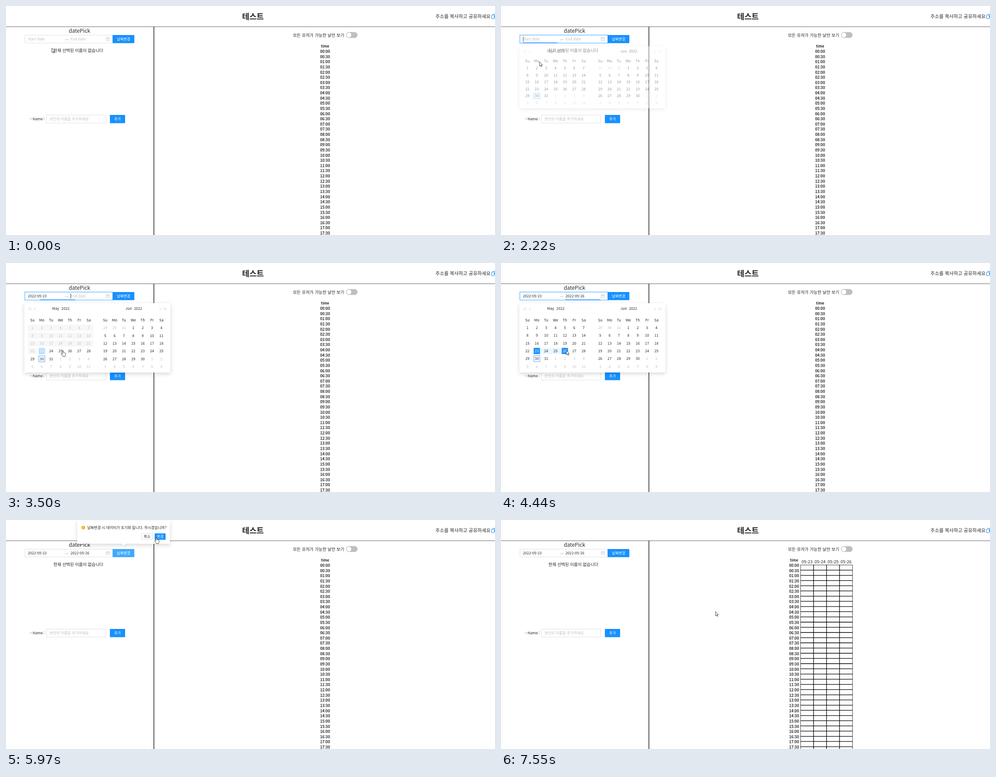
Animation, 1092 px wide and 513 px high, one loop 7750 ms. Source, as an HTML page:

```html
<!DOCTYPE html>
<html lang="ko">
<head>
<meta charset="utf-8">
<title>datePick</title>
<style>
  html, body { margin: 0; width: 100%; height: 100%; overflow: hidden; background: #fff; }
  svg { display: block; width: 100vw; height: 100vh; }
  text { font: 8.2px "Noto Sans CJK KR", "Noto Sans CJK", "Noto Sans", sans-serif; fill: #262626; white-space: pre; }
  .mid { text-anchor: middle; }
  .medium { font-weight: 500; }
  .bold { font-weight: 700; }
  .hint { fill: #bfbfbf; }
  .light { fill: #fff; font-weight: 500; }
  .line { fill: none; stroke: #bfbfbf; stroke-width: .8; }
  .field { fill: #fff; stroke: #d9d9d9; stroke-width: .8; }
  .blue { fill: #1890ff; }
  .float { fill: #fff; filter: drop-shadow(0 3px 5px rgba(0, 0, 0, .16)); }
  .cursor { fill: #fff; stroke: #111; stroke-width: .75; stroke-linejoin: round; }
</style>
</head>
<body>
<svg id="stage" viewBox="0 0 1092 513">
  <rect y="46" width="1092" height="1" fill="#666"/>
  <rect x="329.7" y="46.5" width="1.3" height="467" fill="#000"/>
  <text class="mid bold" x="551.5" y="30.3" style="font-size:17.6px">테스트</text>
  <text class="medium" x="959" y="27" style="font-size:10.6px">주소를 복사하고 공유하세요</text>
  <path d="M1086.5 18.5H1091.5V26M1084.5 20.5H1089L1090.3 22V28.3H1084.5Z" fill="none" stroke="#1890ff"/>

  <text class="mid" x="164.2" y="60.3" style="font-size:11.8px">datePick</text>
  <rect id="glow" x="41.4" y="64.4" width="197.4" height="19.2" fill="none" stroke="#1890ff" stroke-opacity=".22" stroke-width="1.4"/>
  <rect id="range" class="field" x="42.3" y="65.3" width="196" height="17.6"/>
  <text id="from" x="48.7" y="77.2"></text>
  <text id="to" x="144" y="77.2"></text>
  <path class="line" d="M131 75.6H139L136.6 73.4"/>
  <path class="line" d="M223.7 71.2H230.6V77.6H223.7ZM223.7 73.6H230.6M225.5 70V72M228.8 70V72"/>
  <rect id="bar" y="81.7" width="78" height="1.3" class="blue"/>
  <rect id="caret" y="68.5" width=".8" height="11.5" fill="#222"/>
  <rect id="change" x="238" y="65" width="48.6" height="18.3" rx=".8"/>
  <text class="mid light" x="262.5" y="77.2">날짜변경</text>
  <text class="mid medium" x="161.5" y="103.4" style="font-size:9.4px">현재 선택된 이름이 없습니다</text>

  <text x="53.8" y="257.6" style="fill:#ff4d4f">*</text>
  <text x="59.6" y="256.4">Name</text>
  <text x="84" y="256.4">:</text>
  <rect class="field" x="90.3" y="244.3" width="132.2" height="17.8"/>
  <text class="hint" x="97.3" y="256.4">본인의 이름을 추가하세요</text>
  <rect class="blue" x="232" y="244" width="34" height="18.4" rx=".8"/>
  <text class="mid light" x="249" y="256.4">추가</text>

  <text class="medium" x="640.7" y="68.6" style="font-size:9.45px">모든 유저가 가능한 날만 보기</text>
  <rect x="759.2" y="58.6" width="25.8" height="13" rx="6.5" fill="#bfbfbf"/>
  <circle cx="765.8" cy="65.1" r="5.3" fill="#fff"/>
  <g id="times"></g>
  <g id="table"></g>

  <g id="panel">
    <g class="float"><path id="notch" d="M-4.5 90.5L0 86.5L4.5 90.5Z"/><rect x="41" y="90" width="326" height="155.6" rx="1"/></g>
    <path class="line" d="M53 100.2L50.2 102.9L53 105.6M56.6 100.2L53.8 102.9L56.6 105.6M65.6 100.2L62.8 102.9L65.6 105.6M342.8 100.2L345.6 102.9L342.8 105.6M351.6 100.2L354.4 102.9L351.6 105.6M355.2 100.2L358 102.9L355.2 105.6"/>
    <text class="medium" x="103" y="105.3">May</text><text class="medium" x="123.6" y="105.3">2022</text>
    <text class="medium" x="266.8" y="105.3">Jun</text><text class="medium" x="285.7" y="105.3">2022</text>
    <rect id="strip" x="80" y="190.2" width="62.6" height="14" fill="#e6f7ff"/>
    <g id="days"></g>
    <path id="dash" fill="none" stroke="#7ec1ff" stroke-width=".7" stroke-dasharray="1.6 1.2"/>
    <rect x="73.2" y="208" width="13.6" height="13.4" fill="none" stroke="#1890ff" stroke-width=".8"/>
  </g>

  <g id="confirm">
    <g class="float"><path d="M257 52L262.4 57.6L268 52Z"/><rect x="159" y="1" width="207" height="52.2" rx="1"/></g>
    <circle cx="172.6" cy="17" r="4.1" fill="#faad14"/>
    <path d="M172.6 14.6V17.7M172.6 18.6V19.5" stroke="#fff" stroke-width=".9"/>
    <text x="181.2" y="20" style="font-size:8.25px">날짜변경 시 데이터가 초기화 됩니다. 하시겠습니까?</text>
    <rect class="field" x="303.3" y="30.4" width="23.8" height="13.6"/>
    <text class="mid" x="315.2" y="40.3">취소</text>
    <rect id="ok" x="332" y="30" width="24.4" height="14.3" rx=".8"/>
    <text class="mid light" x="344.2" y="40.3">변경</text>
  </g>

  <g id="pointer" class="cursor">
    <path id="arrow" d="M0 0V9.6L2.2 7.6L3.7 11L5.2 10.4L3.7 7.1H6.7Z"/>
    <path id="hand" d="M-1.1 .8Q-1.1 -.2 0 -.2Q1.1 -.2 1.1 .8V4.6Q2.1 4 2.8 5Q3.8 4.4 4.5 5.4Q6.1 5 6.1 6.8V9.5Q6.1 11 5.1 12V13.4H-.6V12.2Q-2.5 10 -3.6 8Q-4.2 6.6 -3 6.4Q-2 6.3 -1.1 8Z"/>
    <path id="beam" fill="none" d="M-2 -5.5H2M0 -5.5V5.5M-2 5.5H2"/>
  </g>
</svg>
<script>
const LOOP = 7750, STEP = 68;
const OPEN = 2200, PICK1 = 3434, PICK2 = 4230, CLOSE = 4400, BLUR = 5340, ASK = 5500, DONE = 7010;
const FOCUS = 2080;

const $ = id => document.getElementById(id);
const set = (node, attrs) => { for (const k in attrs) node.setAttribute(k, attrs[k]); };
const add = (parent, tag, attrs, text) => {
  const node = document.createElementNS("http://www.w3.org/2000/svg", tag);
  set(node, attrs);
  if (text !== undefined) node.textContent = text;
  return parent.appendChild(node);
};
const show = (node, on) => { node.style.display = on ? "" : "none"; };
const clamp = v => Math.min(1, Math.max(0, v));
const pad = n => String(n).padStart(2, "0");

function bezier(x1, y1, x2, y2) {
  const at = (a, b, s) => 3 * (1 - s) * (1 - s) * s * a + 3 * (1 - s) * s * s * b + s * s * s;
  return x => {
    let lo = 0, hi = 1;
    for (let i = 0; i < 24; i++) {
      const m = (lo + hi) / 2;
      if (at(x1, x2, m) < x) lo = m; else hi = m;
    }
    return x <= 0 ? 0 : x >= 1 ? 1 : at(y1, y2, lo);
  };
}
const ease = bezier(.25, .1, .25, 1);
const quintOut = bezier(.23, 1, .32, 1), quintIn = bezier(.755, .05, .855, .06);
const circOut = bezier(.08, .82, .17, 1), circInOut = bezier(.78, .14, .15, .86);
const ramp = (t, start, length, curve = ease) => curve(clamp((t - start) / length));

const runs = [[270, 880], [1070, 1290], [1490, 2220], [2290, 2290], [2480, 3220], [3290, 3960],
  [4100, 4820], [4890, 5100], [5290, 6050], [6120, 6190], [6460, 7210], [7280, 7280], [7470, 7550]];
function snap(t) {
  const run = runs.filter(r => r[0] <= t).pop();
  if (!run) return 0;
  return t >= run[1] ? run[1] : run[0] + STEP * Math.floor((t - run[0]) / STEP);
}

const path = [[0, 102.5, 94.5], [270, 102.5, 94.5], [880, 93, 72], [1030, 93, 72], [1290, 520, 11], [1430, 520, 11],
  [1900, 86, 74], [2090, 86, 74], [2220, 86, 125], [2420, 86, 125], [3220, 77, 196.5], [3290, 77, 196.5],
  [3494, 127, 196], [3960, 143, 196], [4100, 143, 196.5], [4440, 146, 196], [4820, 262, 93], [5100, 267.5, 79.5],
  [5580, 267.5, 79.5], [6050, 341.5, 36], [6430, 341.5, 36], [6868, 434.5, 126], [7210, 446, 142],
  [7400, 446, 142], [7550, 479, 205]];
function cursorAt(t) {
  const i = path.findIndex(p => p[0] > t);
  if (i < 0) return path[path.length - 1].slice(1);
  const [a, b] = [path[i - 1], path[i]];
  const u = (t - a[0]) / (b[0] - a[0]), s = u * u * (3 - 2 * u);
  return [a[1] + (b[1] - a[1]) * s, a[2] + (b[2] - a[2]) * s];
}
const shapes = [[0, "arrow"], [600, "beam"], [1070, "arrow"], [1800, "beam"], [2140, "arrow"], [2600, "hand"],
  [4400, "arrow"], [4950, "hand"], [5700, "arrow"], [5960, "hand"], [6560, "arrow"]];

// Time column and result table
add($("times"), "text", { class: "mid bold", x: 712.5, y: 93.4 }, "time");
for (let i = 0; i < 36; i++)
  add($("times"), "text", { class: "mid bold", x: 712.5, y: 105 + 11.63 * i },
    pad(i >> 1) + (i % 2 ? ":30" : ":00"));
for (let c = 0; c < 5; c++) {
  const x = 669 + 29 * c;
  if (c < 4) add($("table"), "text", { class: "mid", x: x + 14.5, y: 97.4, style: "font-size:9.5px" }, "05-" + (23 + c));
  add($("table"), "path", { d: `M${x} 100.6V513`, stroke: "#000", "stroke-width": c % 4 ? 1.3 : .8 });
}
for (let r = 0; r < 36; r++)
  add($("table"), "path", { d: `M669 ${100.8 + 11.63 * r}H785`, stroke: "#000", "stroke-width": r ? 1.3 : .8 });

// Two calendar months
const COL = 20.92, ROW = 17.4, may = [];
[[59, 0, 31, 31], [221.5, 3, 30, 31]].forEach(([left, lead, size, before], month) => {
  ["Su", "Mo", "Tu", "We", "Th", "Fr", "Sa"].forEach((name, c) =>
    add($("days"), "text", { class: "mid", x: left + COL * c, y: 130.8 }, name));
  for (let i = 0; i < 42; i++) {
    const n = i - lead + 1, inside = n > 0 && n <= size;
    const x = left + COL * (i % 7), y = 145.2 + ROW * Math.floor(i / 7);
    const cell = { n, x };
    if (!month && inside) {
      cell.band = add($("days"), "rect", { x: x - COL / 2, y: y - 7, width: COL, height: 14, fill: "#f7f7f7" });
      cell.back = add($("days"), "rect", { x: x - 7, y: y - 7, width: 14, height: 14 });
      may.push(cell);
    }
    cell.label = add($("days"), "text", { class: inside ? "mid" : "mid hint", x, y: y + 3 },
      n < 1 ? n + before : inside ? n : n - size);
  }
});

function drawDays(t, hover) {
  const off = t >= PICK1 && t < PICK2;
  for (const { n, band, back, label } of may) {
    const pick = n === 23 ? ramp(t, PICK1, 300) : n === 26 ? ramp(t, PICK2, 250) : 0;
    const disabled = off && n < 23;
    show(band, disabled);
    show(back, pick > 0 || n === hover);
    set(back, { fill: pick ? "#1890ff" : "#f5f5f5", "fill-opacity": pick || 1 });
    label.style.fill = pick ? "#fff" : disabled ? "#bfbfbf" : "";
  }
  show($("strip"), t >= PICK2);
  const aim = off && hover > 23;
  show($("dash"), aim);
  if (aim) {
    const right = may[hover - 1].x + 7;
    set($("dash"), { d: `M87 190.2H${right}V204.2H87` });
  }
}

function drawField(t, hover) {
  const write = (node, picked, hint) => {
    const day = picked || hover;
    node.textContent = day ? "2022-05-" + pad(day) : hint;
    node.style.fill = picked ? "" : "#bfbfbf";
  };
  const first = t >= PICK1;
  write($("from"), first ? 23 : 0, "Start date");
  if (first) write($("to"), t >= PICK2 ? 26 : 0, "End date");
  else { $("to").textContent = "End date"; $("to").style.fill = "#bfbfbf"; }

  const focus = ramp(t, FOCUS, 120) * (1 - ramp(t, BLUR, 300));
  const hot = ramp(t, 420, 300) * (1 - ramp(t, BLUR, 300));
  const mix = (a, b) => Math.round(a + (b - a) * hot);
  $("range").style.stroke = `rgb(${mix(217, 64)},${mix(217, 169)},${mix(217, 255)})`;
  $("glow").style.opacity = focus;
  const slide = 96 * ramp(t, PICK1, 300);
  set($("bar"), { x: 48 + slide, opacity: focus });
  set($("notch"), { transform: `translate(${54 + slide} 0)` });
  const since = first ? t - PICK1 : t - FOCUS;
  show($("caret"), since >= 0 && t < PICK2 && since % 1000 < 500);
  set($("caret"), { x: first ? 144 : 49 });
}

function pop(node, amount, x, y, sx) {
  show(node, amount > 0);
  const s = .8 + .2 * amount;
  set(node, { opacity: amount, transform: `translate(${x} ${y}) scale(${sx ? s : 1} ${s}) translate(${-x} ${-y})` });
}

function draw(t) {
  const [x, y] = cursorAt(t);
  const shape = shapes.filter(s => s[0] <= t).pop()[1];
  const over = shape === "hand" && t < PICK2 && !(t >= PICK1 && t < 3550);
  const row = Math.round((y + 1 - 145.2) / ROW), col = Math.round((x - 59) / COL);
  const hover = over && row >= 0 ? row * 7 + col + 1 : 0;

  drawField(t, hover);
  drawDays(t, hover);
  pop($("panel"), ramp(t, OPEN, 160, quintOut) * (1 - ramp(t, CLOSE, 200, quintIn)), 0, 88.8, false);
  pop($("confirm"), ramp(t, ASK, 200, circOut) * (1 - ramp(t, DONE, 200, circInOut)), 262.4, 57.6, true);

  const done = t >= DONE;
  show($("table"), done);
  set($("times"), { transform: `translate(${done ? -58 : 0} 0)` });
  set($("change"), { fill: t >= 4950 && !done ? "#40a9ff" : "#1890ff" });
  set($("ok"), { fill: t >= 6120 ? "#40a9ff" : "#1890ff" });

  set($("pointer"), { transform: `translate(${x} ${y})` });
  for (const id of ["arrow", "hand", "beam"]) show($(id), id === shape);
}

const began = performance.now();
function tick() {
  draw(snap((performance.now() - began) % LOOP));
  requestAnimationFrame(tick);
}
tick();
</script>
</body>
</html>
```
